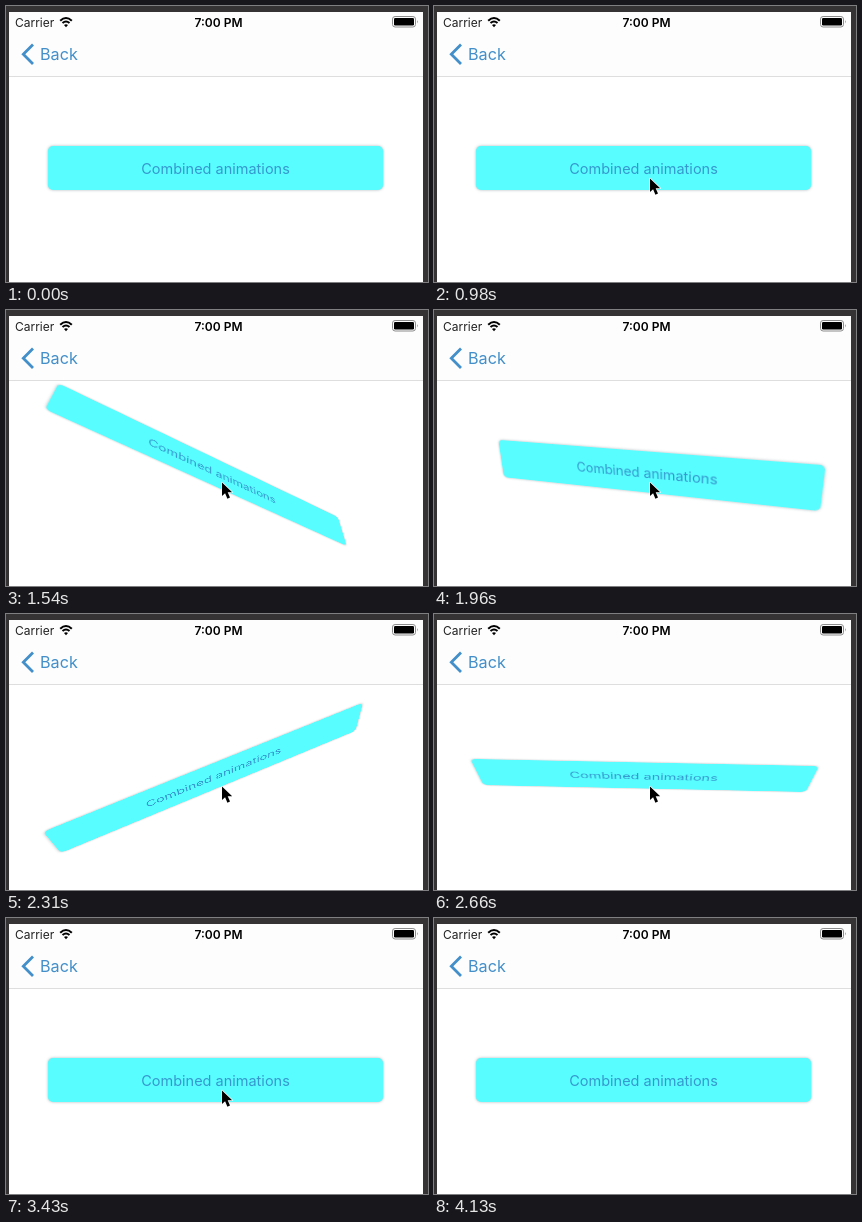
An HTML page that plays this animation: 422 px wide and 276 px high, repeating every 4.2 s.

```html
<!DOCTYPE html>
<html lang="en">
<head>
<meta charset="utf-8">
<title>Combined animations</title>
<style>
  html, body { margin: 0; width: 100%; height: 100%; overflow: hidden; background: #353334; }
  .stage { position: relative; width: 422px; height: 276px; overflow: hidden; font-family: Inter, Roboto, sans-serif; }
  svg { position: absolute; left: 0; top: 0; }
  .button {
    position: absolute; left: 42px; top: 140px; width: 335px; height: 44px;
    border-radius: 5px; background: #58fdff; color: #3698ce;
    box-shadow: 0 0 3px rgba(60, 80, 90, .42);
    font-size: 14.5px; line-height: 45px; text-align: center; white-space: nowrap;
  }
</style>
</head>
<body>
<div class="stage">
  <svg width="422" height="276">
    <rect x="3" y="6" width="414" height="270" fill="#fff"/>
    <rect x="3" y="6" width="414" height="64" fill="#fdfdfd"/>
    <rect x="3" y="70" width="414" height="1" fill="#dedede"/>

    <text x="9" y="20.5" font-size="12" fill="#222">Carrier</text>
    <g fill="none" stroke="#000" stroke-width="2">
      <path d="M54.2 14.8Q60 9.2 65.8 14.8M56.5 17.1Q60 13.8 63.5 17.1"/>
      <path d="M60 21.3l-2-2.2q2-1.7 4 0z" fill="#000" stroke="none"/>
    </g>
    <text x="212.5" y="20.5" font-size="12" font-weight="600" text-anchor="middle">7:00 PM</text>
    <rect x="386.5" y="10.5" width="23" height="10.5" rx="2.6" fill="none" stroke="#8c8c8c"/>
    <rect x="388" y="12" width="20" height="7.5" rx="1.2"/>
    <path d="M411 14q1.6 1.7 0 3.5z" fill="#8c8c8c"/>

    <path d="M27 38.5L17.3 48.2L27 58" fill="none" stroke="#428fca" stroke-width="2.8"/>
    <text x="34" y="54" font-size="16.2" fill="#428fca">Back</text>
  </svg>

  <div class="button" id="button">Combined animations</div>

  <svg width="422" height="276">
    <path id="cursor" d="M0 0V13.6L3.1 10.8L5.4 16.2L8 15.1L5.7 9.8H10.2Z"
          fill="#000" stroke="#fff" stroke-width="1.2" stroke-linejoin="round" paint-order="stroke"/>
  </svg>
</div>
<script>
const LOOP = 4200, STEP = 70;

// [time, rotateX, rotateY, rotateZ]
const tilt = [
  [1050, 0, 0, 0],
  [1330, 28, 9, 6],
  [1540, 55, 20, 25],
  [1750, 26, 0, 30],
  [1960, -22, -18, 5.3],
  [2200, -50, 3, -22],
  [2400, -58, 12, -18],
  [2660, -54, -1, 1.2],
  [2900, -32, -8, 9],
  [3150, -9, 2, 5],
  [3430, 0, 0, 0]
];

// [time, x, y] of the pointer tip
const pointer = [
  [350, 217, 243],
  [490, 217, 214],
  [700, 216, 184],
  [910, 216, 172.5],
  [3500, 216, 172.5],
  [3710, 215, 190],
  [3920, 212, 244],
  [4060, 211, 273]
];

function slope(keys, i, c) {
  const a = keys[i - 1], b = keys[i + 1];
  return a && b ? (b[c] - a[c]) / (b[0] - a[0]) : 0;
}

// Cubic Hermite through the keys, held at both ends
function sample(keys, t, c) {
  const last = keys.length - 1;
  if (t <= keys[0][0]) return keys[0][c];
  if (t >= keys[last][0]) return keys[last][c];
  const i = keys.findIndex(k => k[0] > t) - 1;
  const [p, q] = [keys[i], keys[i + 1]];
  if (p[c] === q[c]) return p[c];
  const span = q[0] - p[0], u = (t - p[0]) / span, v = 1 - u;
  return v * v * (1 + 2 * u) * p[c] + u * u * (3 - 2 * u) * q[c]
    + span * u * v * (v * slope(keys, i, c) - u * slope(keys, i + 1, c));
}

const button = document.getElementById('button');
const cursor = document.getElementById('cursor');

function draw(t) {
  const [x, y, z] = [1, 2, 3].map(c => sample(tilt, t, c));
  button.style.transform = `perspective(450px) rotateZ(${z}deg) rotateY(${y}deg) rotateX(${x}deg)`;
  cursor.setAttribute('transform', `translate(${sample(pointer, t, 1)} ${sample(pointer, t, 2)})`);
  cursor.style.visibility = t >= 350 && t < 4130 ? 'visible' : 'hidden';
}

const start = performance.now();
function tick() {
  const t = (performance.now() - start) % LOOP;
  draw(Math.floor(t / STEP) * STEP);
  requestAnimationFrame(tick);
}
tick();
</script>
</body>
</html>
```
